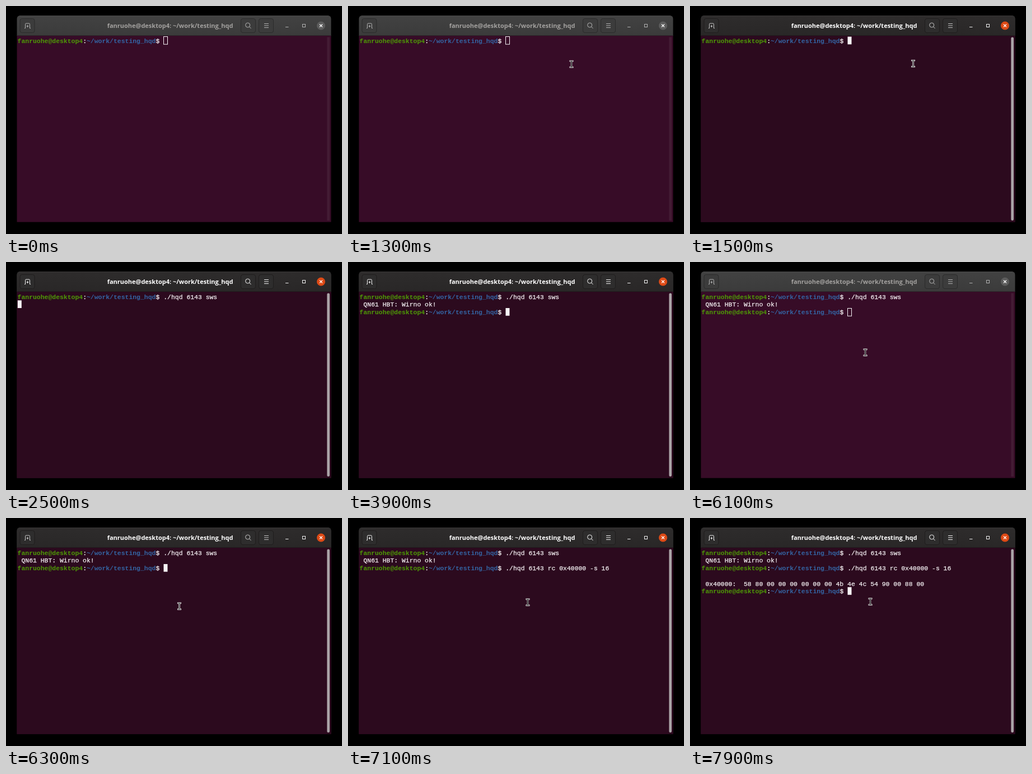
An HTML page that plays this animation: 600x406 px, repeating every 8 s.

```html
<!DOCTYPE html>
<html lang="en">
<head>
<meta charset="utf-8">
<title>Terminal</title>
<style>
  html, body { margin: 0; width: 100%; height: 100%; overflow: hidden; background: #000; }
  svg { display: block; width: 600px; height: 406px; }
  text { white-space: pre; }
  .mono { font: 11.43px "Liberation Mono", monospace; fill: #f6f3f5; stroke: #f6f3f5; stroke-width: 0.25px; }
  .user, .path { font-weight: bold; stroke: none; }
  .user { fill: #4e9a06; }
  .path { fill: #3465a4; }
  .title { font: bold 11px "Open Sans", "Noto Sans", sans-serif; text-anchor: middle; }
</style>
</head>
<body>
<svg id="stage" viewBox="0 0 600 406" xmlns="http://www.w3.org/2000/svg"></svg>
<script>
const LOOP = 8000, COL = 6.86, ROW = 13.7, LEFT = 20.6;
const USER = 'fanruohe@desktop4', DIR = '~/work/testing_hqd';
const stage = document.getElementById('stage');

const themes = {
  idle: { top: '#424242', low: '#3b3b3b', edge: '#4a4a4a', term: '#370c27', title: '#a3a19f',
          button: '#3c3c3c', rim: '#2b2b2b', icon: '#b2b2b2', close: '#5c5c5c', bar: '#431c34' },
  live: { top: '#2e2c2c', low: '#292727', edge: '#393737', term: '#2c0a1e', title: '#ffffff',
          button: '#2e2d2d', rim: '#1f1d1d', icon: '#f4f4f4', close: '#dd4a16', bar: '#aaa3a7' }
};

function chrome(name) {
  const c = themes[name];
  const button = x =>
    `<rect x="${x}" y="22.5" width="26" height="25" rx="3.5" fill="${c.button}" stroke="${c.rim}"/>`;
  return `<g id="${name}">
    <linearGradient id="${name}Bar" x2="0" y2="1">
      <stop stop-color="${c.top}"/><stop offset="1" stop-color="${c.low}"/>
    </linearGradient>
    <path d="M19.5 53V23q0-6 6-6H574.5q6 0 6 6V53Z" fill="url(#${name}Bar)"/>
    <path d="M24 17.5H576" stroke="${c.edge}"/>
    <path d="M19.5 52.5H580.5" stroke="${c.rim}"/>
    <rect x="19.5" y="53" width="561" height="331.7" fill="${c.term}"/>
    <rect x="573.3" y="55.5" width="4.7" height="326.5" rx="${name === 'live' ? 2.3 : 0}" fill="${c.bar}"/>
    ${button(25)}${button(419.5)}${button(451.5)}
    <text class="title" x="293" y="39" fill="${c.title}">${USER}: ${DIR}</text>
    <circle cx="562.5" cy="35" r="7.5" fill="${c.close}"/>
    <g id="${name}Icons" fill="none" stroke="${c.icon}">
      <path d="M33 39.5h1.5v-7q0-1.5 1.5-1.5h5q1.5 0 1.5 1.5v7H44M36.5 36h4M38.5 34v4"/>
      <circle cx="431.7" cy="34" r="4"/><path d="M434.6 37l3 3"/>
      <path d="M461 31.5h8M461 35h8M461 38.5h8"/>
    </g>
    <g fill="none" stroke="${c.icon}">
      <path d="M499 37.5h5.5"/>
      <rect x="529.5" y="32.5" width="5" height="5"/>
      <path d="M560 32.5l5 5m0-5l-5 5" stroke="#fff" stroke-width="1.2"/>
    </g>
  </g>`;
}

const line = (stageNo, row, col, body) =>
  `<text class="mono" data-from="${stageNo}" x="${LEFT + col * COL}" y="${65.7 + row * ROW}">${body}</text>`;
const prompt = (stageNo, row) => line(stageNo, row, 0,
  `<tspan class="user">${USER}</tspan>:<tspan class="path">${DIR}</tspan>$`);

const beam = 'M-2.2-5.5h1.5q.7 0 .7.8V4.7q0 .8-.7.8h-1.5M2.2-5.5H.7Q0-5.5 0-4.7V4.7Q0 5.5 .7 5.5h1.5';

stage.innerHTML = chrome('idle') + chrome('live') +
  prompt(0, 0) + line(1, 0, 38, './hqd 6143 sws') +
  line(2, 1, 1, 'QN61 HBT: Wirno ok!') + prompt(2, 2) +
  line(3, 2, 38, './hqd 6143 rc 0x40000 -s 16') +
  line(4, 4, 1, '0x40000:  58 80 00 00 00 00 00 00 4b 4e 4c 54 90 00 88 00') + prompt(4, 5) +
  `<rect id="block" width="7" height="13.7" fill="#f6f3f5"/>
   <rect id="frame" width="7" height="13.7" fill="none" stroke="#f6f3f5"/>
   <g id="mouse" fill="none" stroke-linecap="square">
     <path d="${beam}" stroke="#f4f4f4" stroke-width="2.6"/>
     <path d="${beam}" stroke="#111" stroke-width="0.9"/>
   </g>`;

// Each step lists only what changes: focus, icon brightness, text stage, caret [row, col], mouse [x, y].
const steps = [
  [0, { focus: 0, icons: 0, text: 0, caret: [0, 38], mouse: null }],
  [500, { mouse: [564.5, 98] }],
  [700, { mouse: [562.5, 103] }],
  [900, { mouse: [530.5, 101] }],
  [1100, { mouse: [464.5, 110] }],
  [1300, { mouse: [399, 103.5] }],
  [1500, { focus: 1, icons: 0.75, mouse: [398.5, 102.5] }],
  [1700, { icons: 1, text: 1, caret: [0, 52], mouse: [397.5, 102] }],
  [2300, { caret: null }],
  [2500, { caret: [1, 0], mouse: null }],
  [3100, { text: 2, caret: null, mouse: [441.5, 144] }],
  [3300, { mouse: [402.5, 176] }],
  [3500, { mouse: [399.5, 177] }],
  [3700, { caret: [2, 38], mouse: [403, 176] }],
  [3900, { mouse: null }],
  [4100, { focus: 0.5 }],
  [4300, { focus: 0.08 }],
  [4500, { focus: 0, icons: 0 }],
  [6100, { mouse: [313, 161] }],
  [6300, { focus: 1, icons: 0.75, mouse: [309.5, 157] }],
  [6500, { icons: 1, mouse: [319.5, 150] }],
  [6700, { text: 3, caret: [2, 65], mouse: [321, 150] }],
  [7100, { caret: null }],
  [7700, { text: 4, caret: [5, 38], mouse: null }],
  [7900, { mouse: [322, 149] }]
];

const get = id => document.getElementById(id);
const [live, liveIcons, block, frame, mouse] = ['live', 'liveIcons', 'block', 'frame', 'mouse'].map(get);
const lines = [...stage.querySelectorAll('[data-from]')];
const show = (el, on) => el.setAttribute('visibility', on ? 'visible' : 'hidden');
const place = (el, at) => {
  show(el, at);
  if (at) el.setAttribute('transform', `translate(${at})`);
};

function draw(t) {
  const s = {};
  for (const [at, change] of steps) if (at <= t) Object.assign(s, change);

  live.setAttribute('opacity', s.focus);
  liveIcons.setAttribute('opacity', s.icons);
  for (const el of lines) show(el, s.text >= +el.dataset.from);

  const solid = s.focus > 0.6;
  const spot = s.caret && [LEFT + 0.2 + s.caret[1] * COL, 54.6 + s.caret[0] * ROW];
  place(block, solid && spot);
  place(frame, !solid && spot && spot.map(v => Math.floor(v) + 0.5));
  place(mouse, s.mouse);
}

const start = performance.now();
function tick() {
  draw((performance.now() - start) % LOOP);
  requestAnimationFrame(tick);
}
tick();
</script>
</body>
</html>
```
